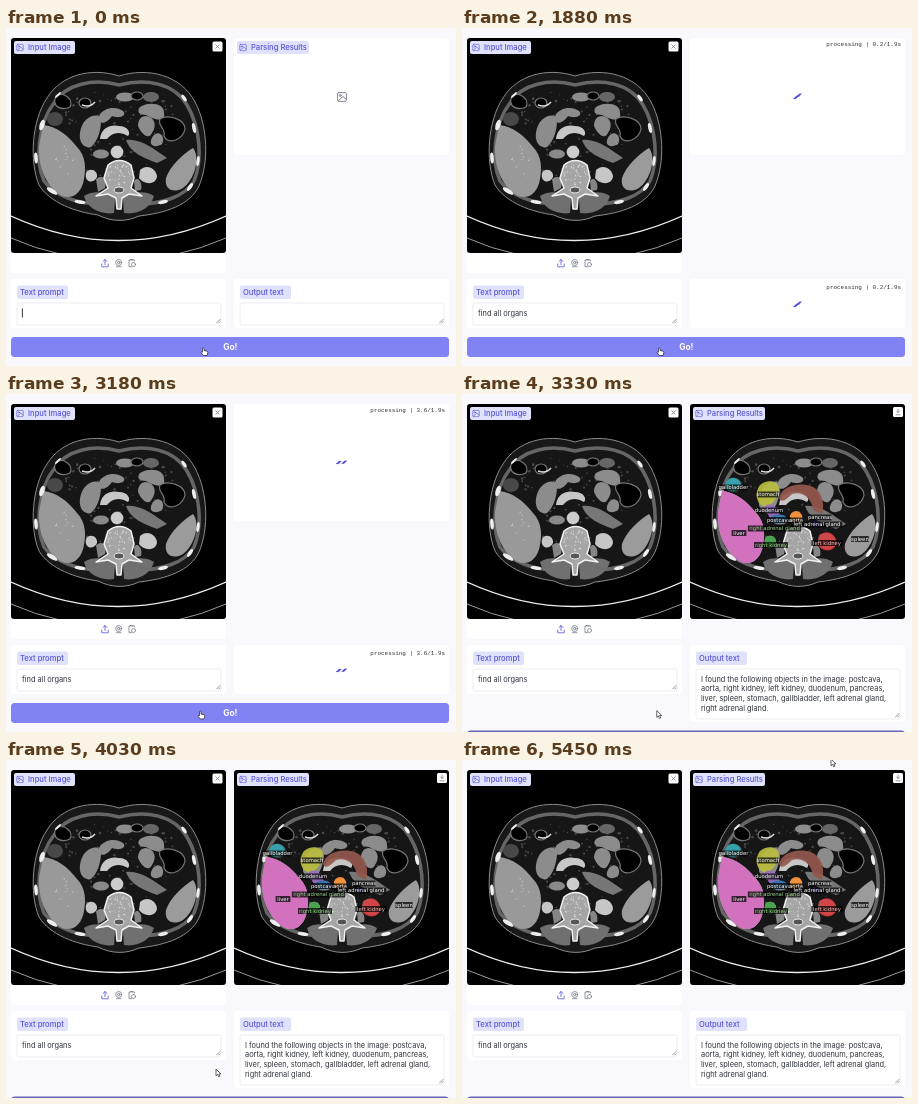
An HTML page that plays this animation: 450 by 338 pixels, repeating every 5510 ms.

```html
<!DOCTYPE html>
<html lang="en">
<head>
<meta charset="utf-8">
<title>Scan parsing demo</title>
<style>
html, body { margin: 0; width: 100%; height: 100%; overflow: hidden; background: #f9f9fd; }
svg { display: block; width: 450px; height: 338px; font-family: Inter, sans-serif; }
.card { fill: #fff; }
.field { fill: #fff; stroke: #e6e7ee; stroke-width: .7; }
.chip { fill: #e0e2fc; }
.label { font-size: 7.6px; font-weight: 500; fill: #5654d8; }
.text { font-size: 7.4px; fill: #30343c; }
.mono { font: 5.93px "Liberation Mono", monospace; fill: #333; text-anchor: end; }
.icon { fill: none; stroke: #777c88; stroke-width: .8; stroke-linejoin: round; stroke-linecap: round; }
.indigo { stroke: #5654d8; }
.tag { font: 5.3px "DejaVu Sans", sans-serif; text-anchor: middle; }
</style>
</head>
<body>
<svg viewBox="0 0 450 338">
  <defs>
    <clipPath id="frame"><rect x="5" y="10" width="215" height="215" rx="3"/></clipPath>
    <symbol id="pic" viewBox="0 0 10 10">
      <rect x="1" y="1" width="8" height="8" rx="1"/><circle cx="3.5" cy="3.6" r=".9"/><path d="M1.5 8.6 6 4.5l3 2.7"/>
    </symbol>
    <g id="loader" fill="#5654d8">
      <path class="up" d="M-5 2.2-1.5-.9 1-.5-2.5 2.6z"/>
      <path class="down" d="M-1 1.2 2.5-1.9 5-1.5 1.5 1.6z"/>
    </g>
    <g id="ct" clip-path="url(#frame)">
      <path d="M5 10h215v215H5z"/>
      <g fill="none">
        <path d="M5 188Q112 237 220 188" stroke="#eee" stroke-width="1.3"/>
        <path d="M5 210Q30 221 54 226M220 210Q195 221 171 226" stroke="#999"/>
      </g>
      <path d="M113 48C85 39 55 47 41 70 26 92 23 133 33 157 44 175 70 184 92 187 106 194 120 194 133 188 160 185 184 177 193 158 203 135 202 98 189 74 175 47 142 39 113 48Z" fill="#181818" stroke="#8b8b8b" stroke-width="1"/>
      <path d="M113 57C87 50 60 56 48 75 32 95 29 133 38 153 49 168 72 176 94 176L113 168 132 176C155 176 179 169 188 153 197 131 194 99 181 77 168 55 140 50 113 57Z" fill="#161616" stroke="#666" stroke-width="3.5"/>
      <g id="fat" fill="#4a4a4a"></g>
      <!-- bowel and gas -->
      <g fill="#8c8c8c">
        <path d="M78 94C84 86 94 85 95 93 95 103 91 114 85 119 74 121 70 107 78 94Z"/>
        <path d="M134 79C142 73 159 75 158 85 160 96 147 91 140 87 134 87 130 84 134 79Z"/>
        <path d="M140 88C149 89 151 98 146 105 142 113 135 105 132 98 132 92 135 88 140 88Z"/>
        <path d="M147 108C153 101 160 109 156 116 151 120 140 119 147 108Z"/>
        <path d="M93 88C98 79 110 78 117 83 122 88 112 91 106 88 99 98 91 96 93 88Z"/>
        <path d="M120 112C134 110 148 121 161 130L151 135C139 130 125 126 120 112Z" fill="#777"/>
        <ellipse cx="119" cy="69" rx="9" ry="4.5"/><ellipse cx="145" cy="69" rx="8" ry="5" fill="#666"/>
        <ellipse cx="49" cy="91" rx="8" ry="7" fill="#484848"/>
      </g>
      <g stroke="#777" stroke-width="1.2">
        <path d="M50 68C58 63 68 72 64 79 56 83 45 79 50 68Z"/>
        <ellipse cx="79" cy="75" rx="6" ry="5"/>
        <ellipse cx="131" cy="68" rx="6" ry="4"/>
        <path d="M154 91C162 86 179 91 179 101 177 111 163 118 158 108 160 100 151 98 154 91Z"/>
      </g>
      <path d="M76 77q8 3 13-3" fill="none" stroke="#ddd" stroke-width="1.5"/>
      <!-- solid organs -->
      <path id="liver" d="M37 97C50 98 62 107 71 119 80 128 80 141 78 151 76 165 66 172 56 168 42 160 32 142 33 118Z" fill="#999"/>
      <g id="vessels" fill="#ccc"></g>
      <path d="M187 120C177 126 164 138 160 150 158 161 167 166 177 160 188 152 195 130 187 120Z" fill="#9b9b9b"/>
      <path d="M94 111C95 99 106 96 113 98 122 98 125 105 122 108 114 103 106 104 101 111Z" fill="#c7c7c7"/>
      <ellipse cx="95" cy="126" rx="8" ry="4.5" fill="#898989"/>
      <circle cx="111" cy="124" r="6" fill="#ccc" stroke="#eee" stroke-width=".6"/>
      <path d="M80 145C83 139 92 142 91 149 88 156 78 155 80 145Z" fill="#c6c6c6"/>
      <path d="M134 142C141 135 151 141 151 149 149 158 137 156 133 150Z" fill="#c6c6c6"/>
      <!-- back muscles and spine -->
      <path d="M90 151C98 145 101 153 99 160L92 164ZM128 153C132 147 137 155 135 162L129 163Z" fill="#858585"/>
      <path d="M78 168C89 161 104 165 109 171L108 185C96 187 81 181 78 168ZM148 168C137 161 122 165 117 171L118 185C131 187 144 181 148 168Z" fill="#707070"/>
      <path d="M102 137C109 131 118 131 125 137L128 150 125 160 136 168 123 166 116 170 115 181 111 181 110 170 102 166 90 168 102 160 98 150Z" fill="#a5a5a5" stroke="#f1f1f1" stroke-width="1.5" stroke-linejoin="round"/>
      <g id="bone" fill="#ddd"></g>
      <ellipse cx="113" cy="162" rx="5" ry="3" fill="#555" stroke="#eee"/>
      <g id="ribs" fill="#eee"></g>
    </g>
    <g id="chips">
      <rect class="chip" x="8" y="13" width="61" height="13" rx="2"/>
      <use href="#pic" class="icon indigo" x="10" y="15.5" width="8" height="8"/>
    </g>
  </defs>

  <rect width="450" height="338" fill="#f9f9fd"/>
  <rect class="card" x="5" y="10" width="215" height="235" rx="3"/>
  <use href="#ct"/>
  <use href="#chips"/>
  <text class="label" x="22" y="22.3">Input Image</text>
  <rect x="206.500" y="13.500" width="10" height="10" rx="1.500" fill="#fff"/>
  <path class="icon" d="M209.800 16.800l3.400 3.400m0-3.400-3.400 3.400"/>
  <g class="icon">
    <path class="indigo" d="M99 236.500v-5m-2 2 2-2 2 2M95.800 236v2.800h6.400V236"/>
    <circle cx="112.700" cy="234.500" r="3"/><circle cx="112.700" cy="234.500" r="1.200"/><path d="M110.500 238.700h4.400"/>
    <path d="M128.500 233v-1H123v6.700h2.500M124.500 231.500h2.500"/><circle cx="127.500" cy="236.500" r="2"/>
  </g>

  <rect class="card" x="5" y="251" width="215" height="49" rx="3"/>
  <rect class="chip" x="11" y="257.500" width="51" height="13.500" rx="2"/>
  <text class="label" x="14" y="267.200">Text prompt</text>
  <rect class="field" x="11" y="275" width="204" height="22" rx="2"/>
  <path class="icon" d="M210.500 295l3.500-3.500m-1.200 3.500 1.200-1.200"/>
  <text class="text" id="prompt" x="16" y="287.700"></text>
  <path id="caret" d="M0 280.500v9" stroke="#222" stroke-width=".9"/>

  <rect class="card" x="228" y="10" width="215" height="117" rx="3"/>
  <rect class="card" id="outCard" x="228" y="251" width="215" height="49" rx="3"/>

  <g id="result">
    <use href="#ct" x="223"/>
    <g id="masks" opacity=".92">
      <use href="#liver" x="223"/>
      <path d="M260 97C273 98 285 107 294 119 303 128 303 141 301 151 299 165 289 172 279 168 265 160 255 142 256 118Z" fill="#d76fc3"/>
      <path d="M264 88C268 81 277 83 279 90 278 98 267 99 263 94Z" fill="#35a8b5"/>
      <path d="M298 91C304 85 316 86 317 94 316 103 312 110 304 113 294 111 292 99 298 91Z" fill="#b9bd3e"/>
      <path d="M302 113C309 107 315 113 318 121L309 126Z" fill="#9a6cc4"/>
      <path d="M317 104C319 94 332 89 344 91 358 92 364 107 360 120L351 116C350 105 341 97 330 100 325 105 319 110 317 104Z" fill="#94584d"/>
      <ellipse cx="317" cy="125" rx="8" ry="4.500" fill="#3579b5"/>
      <circle cx="334" cy="123" r="6" fill="#f28b30"/>
      <path d="M351 127l9 3-7 3z" fill="#2b35e0"/>
      <path d="M303 145C306 139 315 142 314 149 311 156 301 155 303 145Z" fill="#3fa043"/>
      <path d="M357 142C364 134 374 140 375 149 372 159 360 158 356 151Z" fill="#d23c3e"/>
    </g>
    <g id="tags"></g>
    <rect x="431" y="13" width="10" height="10" rx="1.500" fill="#fff"/>
    <path class="icon" d="M436 15v3.500m-1.500-1.500 1.500 1.500 1.500-1.500M434 20.800h4"/>
  </g>

  <g id="heading">
    <rect class="chip" x="231" y="13" width="72" height="13" rx="2"/>
    <use href="#pic" class="icon indigo" x="233" y="15.500" width="8" height="8"/>
    <text class="label" x="245" y="22.300">Parsing Results</text>
  </g>
  <use id="empty" href="#pic" class="icon" x="330.500" y="63.500" width="11" height="11"/>

  <g id="output">
    <rect class="chip" x="234" y="257.500" width="51" height="13.500" rx="2"/>
    <text class="label" x="237" y="267.200">Output text</text>
    <rect class="field" id="outField" x="234" y="275" width="204" height="22" rx="2"/>
    <path class="icon" id="grip" d="M433.500 295l3.500-3.500m-1.200 3.500 1.200-1.200"/>
    <g id="answer" class="text"></g>
  </g>

  <g id="busy">
    <text class="mono" x="439" y="18"></text>
    <text class="mono" x="439" y="260.500"></text>
    <use href="#loader" x="335.500" y="68"/>
    <use href="#loader" x="335.500" y="276"/>
  </g>

  <g id="go">
    <rect id="goFill" x="5" y="309" width="438" height="20" rx="3.500" fill="#8182f3"/>
    <text x="224.300" y="322" text-anchor="middle" font-size="8.300" font-weight="700" fill="#fff">Go!</text>
  </g>

  <g id="cursor" stroke="#222" stroke-width=".7" stroke-linejoin="round" fill="#fff">
    <path id="hand" d="M-.5.6Q.4-.3 1 .7V3l3.200.8Q5 4 4.800 5L4 8H.5L-2 5.200Q-1.800 4-.5 4.700Z"/>
    <path id="arrow" d="M0 0v6.800l1.600-1.400 1.100 2.400 1.200-.6-1.100-2.300h2.100z"/>
  </g>
</svg>

<script>
const $ = id => document.getElementById(id);
const LOOP = 5510, PROMPT = "find all organs", KEY_MS = 80;
const BLUR = 1540, START = 1804, DONE = 3330;

let seed = 7;
const rand = () => (seed = seed * 16807 % 2147483647) / 2147483647;

// Scatter small specks in an ellipse.
function speckle(id, n, cx, cy, rx, ry, size) {
  let s = "";
  for (let i = 0; i < n; i++) {
    const a = rand() * 2 * Math.PI, r = Math.sqrt(rand());
    s += `<circle cx="${cx + rx * r * Math.cos(a)}" cy="${cy + ry * r * Math.sin(a)}" r="${size * (.4 + rand() * .6)}"/>`;
  }
  $(id).innerHTML += s;
}
speckle("fat", 75, 112, 95, 65, 35, 1.3);
speckle("fat", 25, 112, 138, 48, 18, 1.2);
speckle("vessels", 16, 56, 137, 15, 22, .8);
speckle("bone", 50, 113, 146, 12, 11, .8);

// Each rib: x, y, half width, half height, angle.
$("ribs").innerHTML = [
  [36, 97, 2.4, 5.5, 18], [30, 130, 1.8, 5.5, -5], [46, 163, 6, 2.2, 32], [74, 174, 5.5, 1.8, 8],
  [188, 100, 1.8, 5, -12], [192, 133, 1.6, 5, 8], [184, 159, 4.5, 1.8, -55], [157, 174, 5, 1.8, -12],
  [178, 70, 1.7, 4, -35], [52, 67, 4, 1, -45]
].map(([x, y, w, h, a]) => `<ellipse rx="${w}" ry="${h}" transform="translate(${x} ${y}) rotate(${a})"/>`).join("");

$("tags").innerHTML = [
  ["gallbladder", 271.500, 93.500], ["stomach", 306, 100.500], ["duodenum", 307, 116.500],
  ["pancreas", 358, 123.500], ["postcava", 317, 126], ["aorta", 334, 126.500],
  ["left adrenal gland", 355, 130.500], ["right adrenal gland", 312.500, 134.500, "#9fdc91"],
  ["liver", 277, 139], ["right kidney", 309, 151, "#9fdc91"], ["left kidney", 365, 149, "#f5c4c4"], ["spleen", 398, 145]
].map(([name, x, y, color = "#fff"]) => {
  const w = name.length * 2.75 + 1;
  return `<rect x="${x - w / 2}" y="${y - 3}" width="${w}" height="6" opacity=".72"/>
    <text class="tag" x="${x}" y="${y + 1.700}" fill="${color}">${name}</text>`;
}).join("");

$("answer").innerHTML = [
  "I found the following objects in the image: postcava,",
  "aorta, right kidney, left kidney, duodenum, pancreas,",
  "liver, spleen, stomach, gallbladder, left adrenal gland,",
  "right adrenal gland."
].map((line, i) => `<text x="239" y="${287.700 + i * 9.750}">${line}</text>`).join("");

// Pointer tip: time, x, y.
const path = [
  [0, 197, 319.500], [1900, 197, 319.500], [3180, 194, 317], [3390, 195, 316.500], [3940, 210, 309],
  [4060, 210, 309], [4450, 371, 95], [4750, 210, 310], [5060, 371, 95], [5450, 369, -1], [LOOP, 369, -1]
];
function pointer(t) {
  const i = path.findIndex(p => p[0] > t), [t0, x0, y0] = path[i - 1], [t1, x1, y1] = path[i];
  const u = (t - t0) / (t1 - t0), k = u * u * (3 - 2 * u);
  return [x0 + (x1 - x0) * k, y0 + (y1 - y0) * k];
}

const show = (id, on) => $(id).style.display = on ? "" : "none";
const prompt = $("prompt"), clocks = document.querySelectorAll(".mono");

function draw(t) {
  const done = t >= DONE, busy = t >= START && !done;

  prompt.textContent = PROMPT.slice(0, Math.floor(t / KEY_MS));
  const end = prompt.textContent ? prompt.getComputedTextLength() : 0;
  $("caret").setAttribute("transform", `translate(${16.400 + end})`);
  show("caret", t < BLUR);

  show("busy", busy);
  show("heading", !busy);
  show("output", !busy);
  show("empty", t < START);
  show("result", done);
  show("answer", done);
  show("hand", !done);
  show("arrow", done);

  const grow = done ? 28 : 0;
  $("outCard").setAttribute("height", 49 + grow);
  $("outField").setAttribute("height", 22 + grow);
  $("grip").setAttribute("transform", `translate(0 ${grow})`);
  $("go").setAttribute("transform", `translate(0 ${done ? 27.500 : 0})`);
  $("goFill").setAttribute("fill", done ? "#6765b8" : "#8182f3");

  if (busy) {
    const s = ((t - START) * 2.615 / 1000).toFixed(1);
    clocks.forEach(c => c.textContent = `processing | ${s}/1.9s`);
    const a = (t - START) / 1000 * 2 * Math.PI * 1.3;
    const dx = Math.sin(a) * .8, dy = Math.sin(a * 2) * .7;
    document.querySelector(".up").setAttribute("transform", `translate(${dx} ${dy})`);
    document.querySelector(".down").setAttribute("transform", `translate(${-dx} ${-dy})`);
  }
  $("cursor").setAttribute("transform", `translate(${pointer(t)})`);
}

const t0 = performance.now();
function tick() {
  draw((performance.now() - t0) % LOOP);
  requestAnimationFrame(tick);
}
draw(0);
requestAnimationFrame(tick);
</script>
</body>
</html>
```
